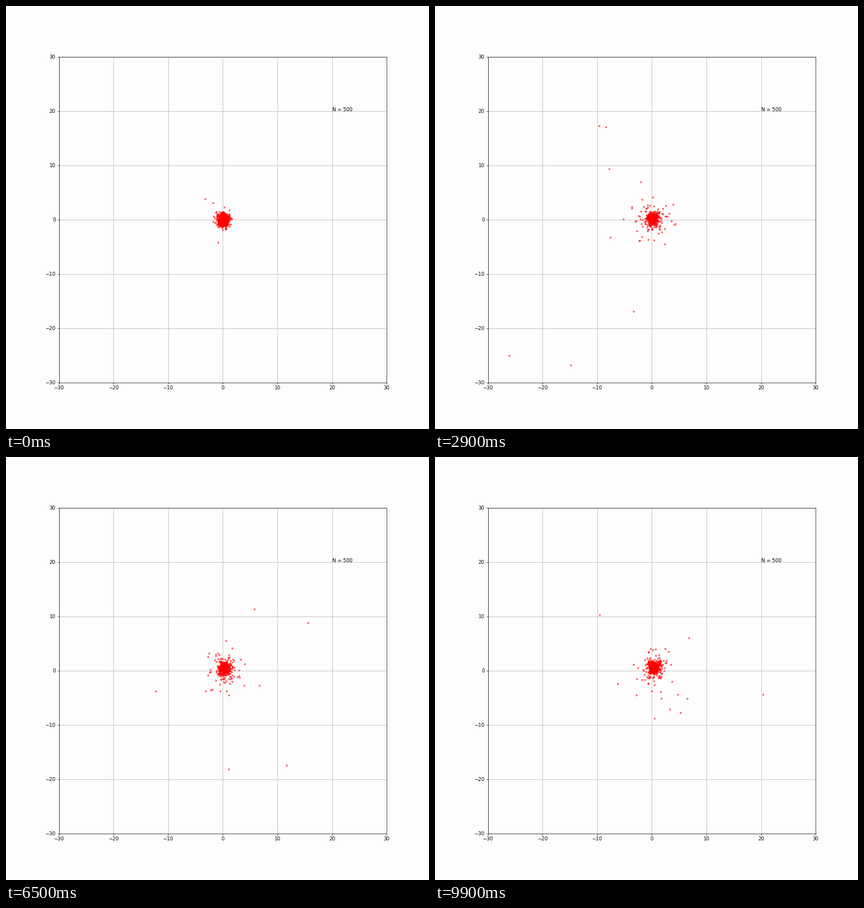
These frames come from a looping animation (748 by 748 pixels, 10000 ms). A matplotlib script:

```python
import numpy as np
import matplotlib.pyplot as plt
from matplotlib.animation import FuncAnimation

SIZE, STEPS, N, HOPS = 748, 100, 500, 115
rng = np.random.default_rng(12)
k = np.arange(STEPS)[:, None]

# Bodies flung out for good: place after 10 steps, power of the slowdown
ESCAPES = [(18.1, 15.3, 0.93), (-9.9, -9.5, 0.91), (-8.5, -15.4, 0.52),
           (-25, -36, 1)]

# Widest bound orbits: step of the turning point, half duration, place
WIDE = [(24, 25, -9.9, 17.7), (24, 24, -8.7, 17.6), (18, 20, -10, 12),
        (28, 30, -3.4, -16.9), (58, 25, 16.5, 9.3), (43, 12, -10.6, -1.3),
        (67, 15, -12.4, -3.8), (72, 33, 1.1, -18.7), (72, 32, 12.1, -18),
        (68, 19, 5.9, 11.5), (94, 27, 20.8, -4.5), (94, 15, -10.4, 11.2)]


def escape(x, y, power):
    return (k / 10) ** power * np.array([x, y])


def hop(peak, half, x, y):
    """Leave the core, turn at (x, y) and fall back."""
    reach = np.clip(1 - ((k - peak) / half) ** 2, 0, 1) ** 0.68
    return reach * np.array([x, y])


def random_hop():
    r = 3 + min(rng.exponential(2.2), 8)
    angle = rng.uniform(0, 2 * np.pi)
    half = 5 + 0.6 * r
    launch = max(0, rng.uniform(-10, 95))
    return hop(launch + half, half, r * np.cos(angle), r * np.sin(angle))


flights = [escape(*e) for e in ESCAPES] + [hop(*w) for w in WIDE]
flights += [random_hop() for _ in range(HOPS)]
out = np.stack(flights, axis=1)
M = out.shape[1]

# Core: drifting ellipses that spread out after the start
spread = np.minimum(np.exp(0.68 * rng.normal(size=N)), 4.5)
spread[:M] = 1
a, b = 0.6 * rng.normal(size=(2, N, 2))
rate = rng.uniform(0.35, 0.8, N) * rng.choice([-1, 1], N) / spread ** 0.8
phase = (k * rate)[..., None]
grow = 1 + (spread - 1) * np.minimum(k / 8, 1)
pos = (a * np.cos(phase) + b * np.sin(phase)) * grow[..., None]
pos += np.array([0.4, 0.6]) * k[..., None] / STEPS

# Far from the core a flight replaces the core motion
fade = np.exp(-np.sum(out ** 2, axis=2, keepdims=True))
pos[:, :M] = out + pos[:, :M] * fade

fig, ax = plt.subplots(figsize=(12, 12), dpi=SIZE / 12, facecolor="#fdfdfd")
ax.set(xlim=(-30, 30), ylim=(-30, 30), facecolor="#fdfdfd")
ax.tick_params(axis="x", pad=3)
ax.grid(True)
ax.text(20, 20, f"N = {N}")
dots, = ax.plot([], [], "r.", alpha=0.5)


def update(i):
    dots.set_data(pos[i, :, 0], pos[i, :, 1])
    return dots,


anim = FuncAnimation(fig, update, frames=STEPS, interval=100,
                     repeat=True, repeat_delay=0)
plt.show()
```
